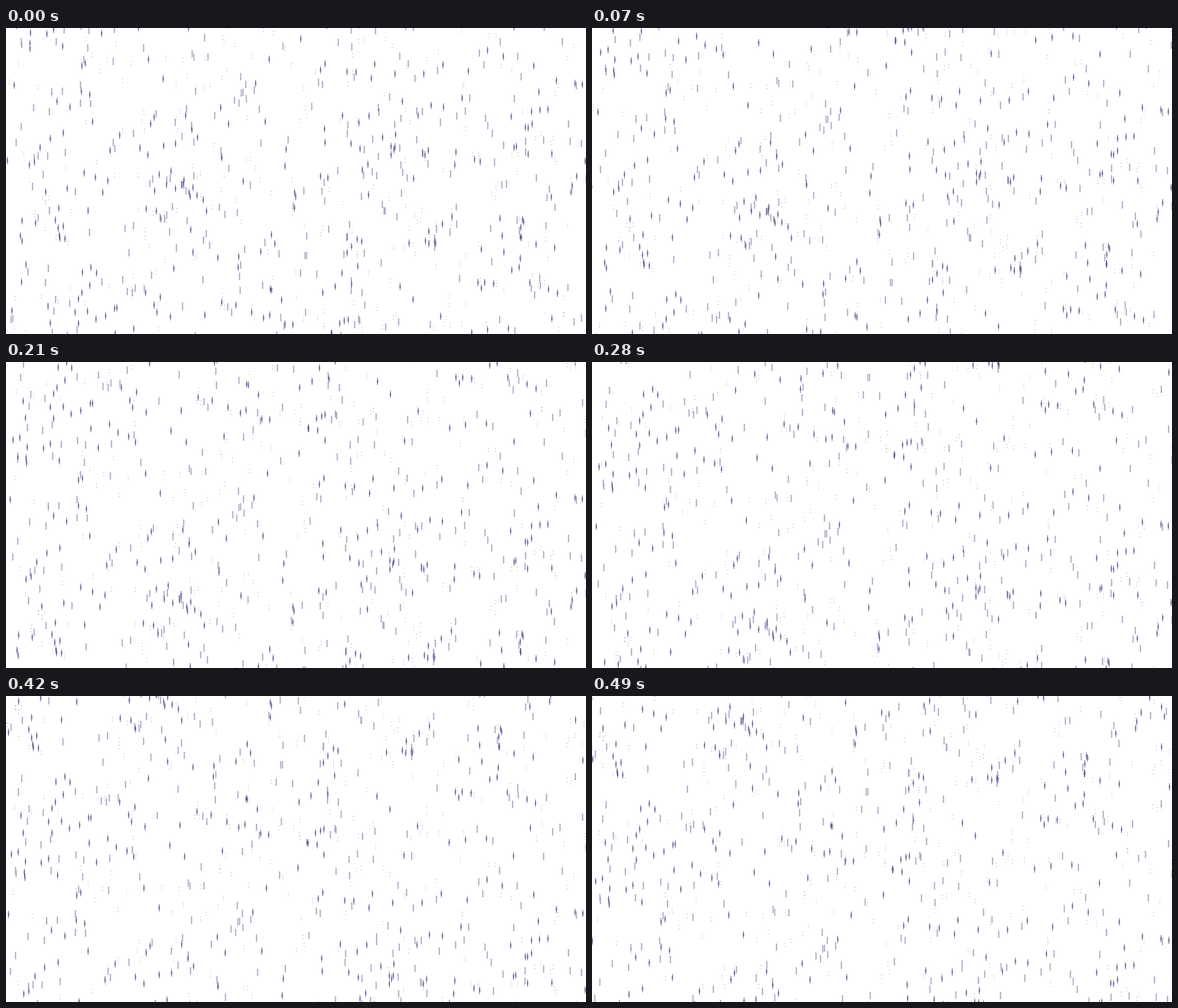
Recreate the animation shown at these times as an HTML page with a canvas. Size 1028 by 544 pixels, loop 0.56 s.

```html
<!DOCTYPE html>
<html lang="en">
<head>
<meta charset="utf-8">
<title>Rain</title>
<style>
html, body { margin: 0; width: 100%; height: 100%; overflow: hidden; background: #fff; }
canvas { display: block; }
</style>
</head>
<body>
<canvas id="stage" width="1028" height="544"></canvas>
<script>
const ctx = document.getElementById('stage').getContext('2d');
const W = 1028, H = 544;
const STEP = 70, STEPS = 8;
const TILE = { width: 1095, height: 568, lean: 38, slope: -.165, top: 11 };

// Centres of the densest showers.
const showers = [
  [271, 260], [315, 270], [331, 283], [266, 325], [95, 373], [52, 346],
  [682, 225], [742, 225], [749, 383], [612, 388], [966, 300], [915, 340],
  [256, 170], [318, 155], [790, 335], [570, 266], [620, 78], [904, 210]
];

let seed = 4127;
function random() {
  seed = seed * 16807 % 2147483647;
  return seed / 2147483647;
}
const spread = size => (random() - .5) * size;

function dots(x, y) {
  ctx.fillStyle = '#77778f';
  ctx.fillRect(x, y - 3, 1, 1);
  ctx.fillRect(x, y + 3, 1, 1);
}

function streak(x, y) {
  ctx.fillStyle = '#5c5c94';
  for (let row = -6; row < 7; row++) ctx.fillRect(x + (row & 1), y + row, 1, 1);
}

function diamond(x, y) {
  ctx.fillStyle = '#5c5c94';
  ctx.fillRect(x, y - 6, 1, 13);
  for (let row = -2; row < 3; row += 2) ctx.fillRect(x - 1, y + row, 3, 1);
}

function pickShape() {
  const r = random();
  return r < .33 ? dots : r < .68 ? streak : diamond;
}

const drops = [];
for (const [x, y] of showers) {
  drops.push({ x, y, shape: diamond });
  for (let i = 0; i < 3; i++) {
    drops.push({ x: x + spread(36), y: y + spread(44), shape: pickShape() });
  }
}
while (drops.length < 800) {
  const x = random() * TILE.width - 5;
  const y = TILE.top + TILE.slope * x + random() * TILE.height;
  drops.push({ x, y, shape: pickShape() });
}

function frame(now) {
  const step = Math.floor(now / STEP) % STEPS;
  const fall = 47.7 * step;
  // Drifts left as it falls, swaying on every other step; the right edge stays put.
  const drift = -1.7 * step - (step % 2 ? 1.5 : 0);

  ctx.fillStyle = '#fff';
  ctx.fillRect(0, 0, W, H);
  for (const { x, y, shape } of drops) {
    const px = x + drift * (1 - x / 1000);
    for (let k = -1; k < 2; k++) {
      const py = y + fall + k * TILE.height;
      if (py > -10 && py < H + 10) shape(Math.round(px + k * TILE.lean), Math.round(py));
    }
  }
  requestAnimationFrame(frame);
}
frame(0);
</script>
</body>
</html>
```
